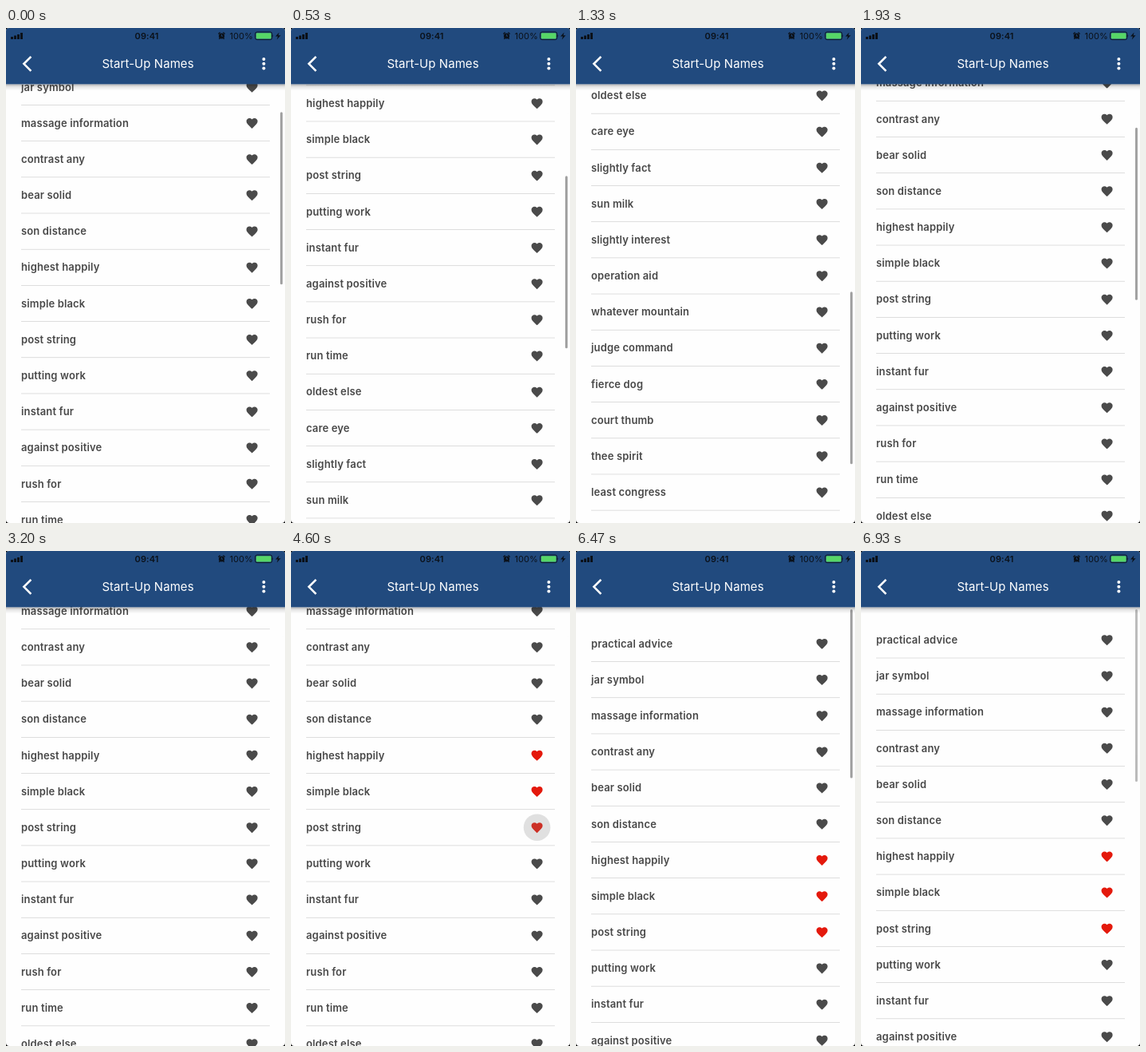
An HTML page that plays this animation: 350x620 px, repeating every 6.99 s.

```html
<!DOCTYPE html>
<html lang="en">
<head>
<meta charset="utf-8">
<title>Start-Up Names</title>
<style>
html, body { margin: 0; height: 100%; overflow: hidden; background: #000; }
svg { display: block; width: 350px; height: 620px; border-radius: 4px; font-family: Inter, "Open Sans", sans-serif; }
.row text { font-size: 13px; font-weight: 600; letter-spacing: .14px; fill: #484848; }
.row rect { fill: #d0d0d0; }
.row path { fill: #4a4a4a; }
.row circle { fill: #7d7d7d; }
.row.liked path { fill: #e4190c; }
</style>
</head>
<body>
<svg viewBox="0 0 350 620">
  <defs>
    <linearGradient id="shade" x2="0" y2="1">
      <stop stop-opacity=".3"/>
      <stop offset=".4" stop-opacity=".1"/>
      <stop offset="1" stop-opacity="0"/>
    </linearGradient>
  </defs>
  <rect width="350" height="620" fill="#fefefe"/>
  <g id="list"></g>
  <rect id="bar" x="344" width="3" rx="1.5" fill="#000"/>
  <rect y="70.4" width="350" height="8" fill="url(#shade)"/>
  <rect width="350" height="70.4" fill="#214a7e"/>

  <!-- status bar -->
  <g fill="#0b1119">
    <path d="M6 11h3v3h-3zM10 9.5h3v4.5h-3zM14 8h3v6h-3zM18 6h3v8h-3z"/>
    <text x="176.5" y="13.5" font-size="11" font-weight="600" letter-spacing=".1" text-anchor="middle">09:41</text>
    <circle cx="270.5" cy="10" r="3.6"/>
    <path d="M266.4 7.6l2.2-2M274.6 7.6l-2.2-2M268.4 12.5l-1 1.3M272.6 12.5l1 1.3" stroke="#0b1119" stroke-width="1.3"/>
    <path d="M270.5 8v2.2h1.6" fill="none" stroke="#214a7e" stroke-width=".8"/>
    <text x="280.6" y="13.5" font-size="11">100%</text>
    <rect x="312.7" y="5" width="21" height="9.6" rx="2.2" fill="none" stroke="#0b1119" stroke-width=".9"/>
    <path d="M334.5 8.2q1.5 1.6 0 3.2z"/>
    <path d="M342.6 5.5l-4.6 5h3l-1.2 4 4.8-5.2h-3z"/>
  </g>
  <rect x="313.8" y="6.2" width="18.8" height="7.2" rx="1.2" fill="#57d667"/>

  <!-- title bar -->
  <path d="M31.4 35.8l-9 9 9 9" fill="none" stroke="#fff" stroke-width="2.6"/>
  <text x="178" y="50.3" font-size="15" letter-spacing=".05" text-anchor="middle" fill="#fff">Start-Up Names</text>
  <g fill="#fff">
    <circle cx="323.4" cy="39" r="2"/><circle cx="323.4" cy="44.8" r="2"/><circle cx="323.4" cy="50.6" r="2"/>
  </g>
</svg>
<script>
const LOOP = 6990, FPS = 15, TOP = 111.3, PITCH = 45.18;
const names = `practical advice,jar symbol,massage information,contrast any,bear solid,son distance,
highest happily,simple black,post string,putting work,instant fur,against positive,rush for,run time,
oldest else,care eye,slightly fact,sun milk,slightly interest,operation aid,whatever mountain,
judge command,fierce dog,court thumb,thee spirit,least congress`.split(/,\s*/);
const heart = 'M12 21.35l-1.45-1.32C5.4 15.36 2 12.28 2 8.5 2 5.42 4.42 3 7.5 3c1.74 0 3.41.81 4.5 2.09' +
  'C13.09 3.81 14.76 3 16.5 3 19.58 3 22 5.42 22 8.5c0 3.78-3.4 6.86-8.55 11.54z';

const list = document.getElementById('list'), bar = document.getElementById('bar');
list.innerHTML = names.map((name, i) => `<g class="row" transform="translate(0 ${TOP + i * PITCH})">
  <text x="19" y="4.7">${name}</text>
  <path transform="translate(308.6 .45) scale(.705) translate(-12 -12.2)" d="${heart}"/>
  <circle cx="308.6" r="16.8" opacity="0"/>
  <rect x="19" y="22.3" width="312" height=".7"/></g>`).join('');
const rows = [...list.children];

// Taps on the hearts: row, press time, time the highlight leaves
const taps = [[6, 3260, 3800], [7, 3800, 4330], [8, 4330, 5550]];

// Scroll offset over time
const keys = [[0, 82.64], [933, 453.6], [1333, 659.3], [1400, 661], [1470, 610], [1600, 400], [1750, 220],
  [1933, 133], [2400, 126.5], [5880, 126.5], [5933, 105], [6000, 52], [6053, 0]];
const slope = i => (keys[i + 1][1] - keys[i][1]) / (keys[i + 1][0] - keys[i][0]);
const tangent = i => {
  if (i === 0) return slope(0);
  if (i === keys.length - 1) return slope(i - 1);
  const a = slope(i - 1), b = slope(i);
  return a * b > 0 ? 2 * a * b / (a + b) : 0;
};

function scrollAt(t) {
  const last = keys[keys.length - 1][0];
  if (t >= last) return (last - t) * Math.exp((last - t) / 92); // rubber-band bounce
  const i = keys.findIndex((k, n) => t < keys[n + 1][0]);
  const [t0, y0] = keys[i], [t1, y1] = keys[i + 1], d = t1 - t0, u = (t - t0) / d, v = 1 - u;
  return y0 * (1 + 2 * u) * v * v + tangent(i) * d * u * v * v
    + y1 * u * u * (3 - 2 * u) - tangent(i + 1) * d * u * u * v;
}

const ramp = (t, start, length) => Math.min(1, Math.max(0, (t - start) / length));

function draw() {
  const now = performance.now() % LOOP;
  const t = Math.floor((now + 4) * FPS / 1000) * 1000 / FPS;
  const s = scrollAt(t);
  list.setAttribute('transform', `translate(0 ${-s})`);
  bar.setAttribute('y', 73 + .39 * Math.max(s, 0));
  bar.setAttribute('height', 216 + Math.min(s, 0));
  const shown = t < 5000 ? 1 - ramp(t, 2650, 250) : ramp(t, 5880, 60) - ramp(t, 6880, 200);
  bar.setAttribute('opacity', .36 * shown);
  for (const [i, press, leave] of taps) {
    rows[i].classList.toggle('liked', t >= press + 60);
    rows[i].querySelector('circle').setAttribute('opacity', .23 * (ramp(t, press, 130) - ramp(t, leave, 180)));
  }
  requestAnimationFrame(draw);
}
draw();
</script>
</body>
</html>
```
